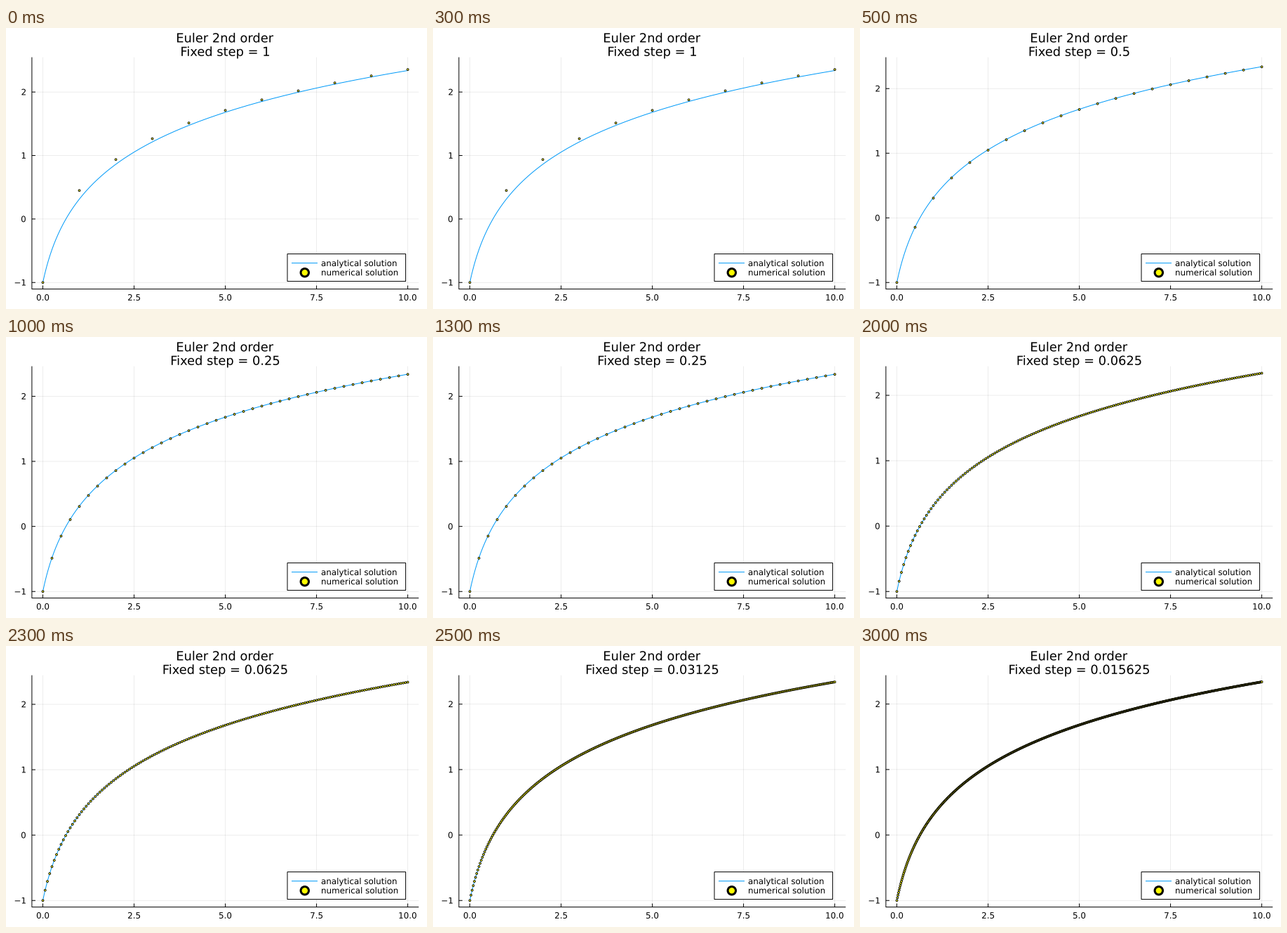
Animation, 600 px wide and 400 px high, one loop 3500 ms. Source, as a matplotlib script:

```python
import numpy as np
import matplotlib.pyplot as plt
from matplotlib.animation import FuncAnimation
from matplotlib.collections import PatchCollection
from matplotlib.patches import Circle, PathPatch, Rectangle
from matplotlib.textpath import TextPath
from matplotlib.transforms import Affine2D

W, H, DPI = 600, 400, 100
PT = 72 / DPI                      # points per pixel
LEFT, RIGHT, TOP, BOTTOM = 36.9, 588.2, 41.6, 371.6
X_MAX, Y_START, PAD = 10, -1, 0.03
STEPS = [2.0 ** -k for k in range(7)]
BLUE, YELLOW = "#009af9", "#ffff00"
TITLE, LABEL = 17.85, 11.9         # font sizes in pixels
TICK = 5

plt.rcParams["font.family"] = "DejaVu Sans"
fig = plt.figure(figsize=(W / DPI, H / DPI), dpi=DPI, facecolor="white")
ax = fig.add_axes([0, 0, 1, 1])


def exact(x):
    """Solution of y' = exp(-y), y(0) = -1."""
    return np.log(x + np.exp(Y_START))


def heun(h):
    """Second-order Euler steps from 0 to one step past X_MAX."""
    ys = [Y_START]
    for _ in range(round(X_MAX / h) + 1):
        y = ys[-1]
        k1 = np.exp(-y)
        k2 = np.exp(-(y + h * k1))
        ys.append(y + h * (k1 + k2) / 2)
    return h * np.arange(len(ys)), np.array(ys)


def text(x, y, s, size, align="left"):
    """Text with its baseline at y; centre and right align the ink."""
    path = TextPath((0, 0), s, size=size)
    box = path.get_extents()
    shift = {"left": 0, "center": (box.x0 + box.x1) / 2, "right": box.x1}[align]
    place = Affine2D().scale(1, -1).translate(x - shift, y)
    ax.add_patch(PathPatch(place.transform_path(path), fc="black", lw=0, zorder=6))


def line(xs, ys, color="black", width=1.0, z=2, **style):
    ax.plot(xs, ys, color=color, lw=width * PT, zorder=z, snap=False,
            solid_capstyle="butt", **style)


def dots(xs, ys, radius, edge, z):
    circles = [Circle(p, radius) for p in zip(xs, ys)]
    ax.add_collection(PatchCollection(circles, facecolor=YELLOW, edgecolor="black",
                                      linewidth=edge * PT, zorder=z))


def legend():
    ax.add_patch(Rectangle((401, 321.6), 168.6, 39, fc="white", ec="black",
                           lw=PT, zorder=5, snap=False))
    line([407, 444], [334.6] * 2, BLUE, z=6)
    dots([425.3], [347.7], 5.7, 3, 6)
    text(449, 339, "analytical solution", LABEL)
    text(449, 352.2, "numerical solution", LABEL)


def draw(i):
    ax.clear()
    ax.set(xlim=(0, W), ylim=(H, 0))
    ax.axis("off")

    h = STEPS[i]
    xs, ys = heun(h)
    y_range = ys[-1] - Y_START
    y_low = Y_START - PAD * y_range
    x_scale = (RIGHT - LEFT) / (X_MAX * (1 + 2 * PAD))
    y_scale = (BOTTOM - TOP) / (y_range * (1 + 2 * PAD))

    def px(x):
        return LEFT + (x + PAD * X_MAX) * x_scale

    def py(y):
        return BOTTOM - (y - y_low) * y_scale

    for x in np.arange(0, 10.1, 2.5):
        line([px(x)] * 2, [TOP, BOTTOM], width=0.7, z=1, alpha=0.1)
        line([px(x)] * 2, [BOTTOM, BOTTOM - TICK])
        text(px(x), 387.8, f"{x:.1f}", LABEL, "center")
    for y in range(-1, 3):
        line([LEFT, RIGHT], [py(y)] * 2, width=0.7, z=1, alpha=0.1)
        line([LEFT, LEFT + TICK], [py(y)] * 2)
        text(27.9, py(y) + 4.3, str(y).replace("-", "\u2212"), LABEL, "right")
    line([LEFT, LEFT, RIGHT], [TOP, BOTTOM, BOTTOM])

    curve = np.linspace(0, X_MAX, 600)
    line(px(curve), py(exact(curve)), BLUE, z=3)
    dots(px(xs[:-1]), py(ys[:-1]), 1.4, 0.9, 4)

    legend()
    middle = (LEFT + RIGHT) / 2
    text(middle, 20.4, "Euler 2nd order", TITLE, "center")
    text(middle, 39.8, f"Fixed step = {h:g}", TITLE, "center")


anim = FuncAnimation(fig, draw, frames=len(STEPS), init_func=lambda: None,
                     interval=500, repeat=True, repeat_delay=0)
plt.show()
```
